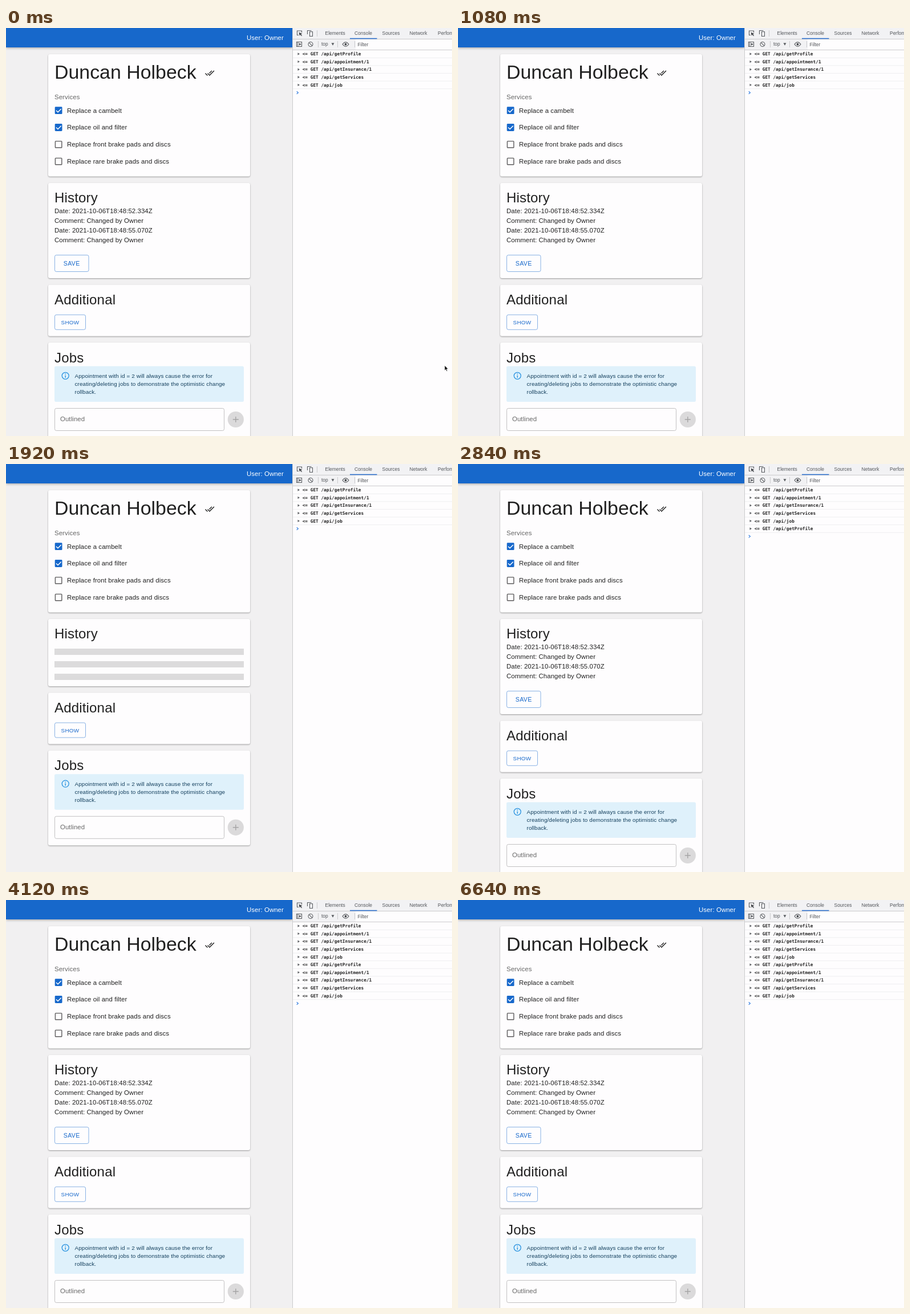
Write an HTML page that moves like this. It is 782 px wide and 716 px high and loops after 6.68 s.

```html
<!DOCTYPE html>
<html lang="en">
<head>
<meta charset="utf-8">
<title>Refetch on focus</title>
<style>
  html, body { margin: 0; width: 100%; height: 100%; overflow: hidden; background: #fefdfe; }
  svg { display: block; width: 782px; height: 716px; }
  text { font: 11.36px "Liberation Sans", Arial, sans-serif; letter-spacing: .0094em; fill: #202020; white-space: pre; }
  .name { font-size: 33.9px; letter-spacing: 0; }
  .title { font-size: 24px; letter-spacing: .0073em; }
  .grey { fill: #666; }
  .button { font-size: 9.9px; letter-spacing: .0286em; fill: #1768cb; }
  .alert { font-size: 9.9px; letter-spacing: .0107em; fill: #15405e; }
  .tab { font-size: 8.45px; letter-spacing: 0; fill: #55585c; }
  .log { font: bold 7.77px "DejaVu Sans Mono", monospace; letter-spacing: 0; fill: #222; }
  .start { font-family: Roboto, sans-serif; letter-spacing: 0; }
  .card { fill: #fefdfe; filter: drop-shadow(0 1px .8px rgba(0, 0, 0, .36)); }
  .outline { fill: none; stroke: #1768cb; stroke-opacity: .5; }
  .icon { fill: none; stroke: #5a5d61; stroke-width: 1.1; }
  .rule { stroke: #cbcbcd; stroke-width: 1; }
</style>
</head>
<body>
<svg viewBox="0 0 782 716">
  <g id="app">
    <rect width="502" height="716" fill="#f1f0f1"/>
    <rect width="502" height="34" fill="#1768cb" style="filter:drop-shadow(0 1.5px 2px rgba(0,0,0,.35))"/>
    <text x="422" y="21" style="fill:#fff">User: Owner</text>

    <rect class="card" x="74" y="46" width="354" height="214.5" rx="3"/>
    <text class="name" x="85" y="88.5">Duncan Holbeck</text>
    <path transform="translate(348.7 70.6) scale(.706)" fill="#202020" d="M18 7l-1.4-1.4-6.35 6.33 1.4 1.4zM22.2 5.6L11.7 16.2 7.5 12l-1.4 1.4 5.6 5.6 12-12zM.4 13.4L6 19l1.4-1.4L1.8 12z"/>
    <text class="grey" x="85" y="125">Services</text>
    <g id="services"></g>

    <rect class="card" id="historyCard" x="74" y="272" width="354" rx="3"/>
    <text class="title" x="85" y="306.3">History</text>
    <g id="history">
      <text x="85" y="325.3">Date: 2021-10-06T18:48:52.334Z</text>
      <text x="85" y="342.3">Comment: Changed by Owner</text>
      <text x="85" y="359.3">Date: 2021-10-06T18:48:55.070Z</text>
      <text x="85" y="376.3">Comment: Changed by Owner</text>
      <rect class="outline" x="85.5" y="398.5" width="59.5" height="29" rx="2.8"/>
      <text class="button" x="115.2" y="416.8" text-anchor="middle" style="font-size:10.6px">SAVE</text>
    </g>
    <path id="skeleton" fill="#dcdbdc" d="M85 324h332v11H85zM85 346h332v11H85zM85 368h332v11H85z"/>

    <g id="lower">
      <rect class="card" x="74" y="450.5" width="354" height="90.3" rx="3"/>
      <text class="title" x="85" y="485.3">Additional</text>
      <rect class="outline" x="85.5" y="503.3" width="54" height="26" rx="2.8"/>
      <text class="button" x="112.5" y="519.8" text-anchor="middle">SHOW</text>

      <rect class="card" x="74" y="552" width="354" height="166.5" rx="3"/>
      <text class="title" x="85" y="586.7">Jobs</text>
      <rect x="85" y="593.5" width="332" height="62.5" rx="2.8" fill="#dff1fb"/>
      <circle cx="104.2" cy="610.3" r="6" fill="none" stroke="#2a93e0" stroke-width="1.3"/>
      <path d="M104.2 606.6v1.5M104.2 609.4v4.3" stroke="#2a93e0" stroke-width="1.4"/>
      <text class="alert" x="120.5" y="613.8">Appointment with id = 2 will always cause the error for</text>
      <text class="alert" x="120.5" y="628">creating/deleting jobs to demonstrate the optimistic change</text>
      <text class="alert" x="120.5" y="642.3">rollback.</text>
      <rect x="85.5" y="667.5" width="297" height="39" rx="2.8" fill="none" stroke="#c2c1c2"/>
      <text class="grey" x="95" y="690.2">Outlined</text>
      <circle cx="402.8" cy="687" r="14.1" fill="#dbdadb"/>
      <path d="M397.8 687h10M402.8 682v10" stroke="#a5a4a5" stroke-width="1.4"/>
    </g>

    <rect x="502" width="280" height="716" fill="#fefdfe"/>
    <rect x="502" width="280" height="38" fill="#f2f2f4"/>
    <rect x="613" y="20" width="169" height="18" fill="#fefdfe"/>
    <path class="rule" d="M502.5 0V716M503 19.5H782M503 38.5H782M545.5 4v11M547.5 23v11M581.5 23v11M611.5 23v11"/>
    <path d="M603 18.5h47.5" stroke="#2b6fd0" stroke-width="1.6"/>
    <g id="tabs"></g>
    <path class="icon" d="M513 12.5h-2.5v-7.5h8v3M528.5 11V4.5h7M532.5 6.5h5v8h-5zM509.5 24.5h9v8h-9zM511.8 24.5v8"/>
    <path fill="#45484c" d="M513.5 7.5l6 2.4-2.4 1 2 2.4-1 .9-2-2.5-1.4 1.8zM514 26.2l3.6 2.3-3.6 2.3z"/>
    <path class="icon" d="M530 28.5a4 4 0 1 0 8 0a4 4 0 1 0-8 0M531.3 25.7l5.6 5.6M590 28.5q5.5-7.6 11 0q-5.5 7.6-11 0z"/>
    <circle cx="595.5" cy="28.5" r="1.9" fill="#45484c"/>
    <text class="tab" x="553" y="31.3">top</text>
    <path d="M570.5 26.3h5l-2.5 4.4z" fill="#5a5d61"/>
    <text class="tab" x="616.5" y="31.5">Filter</text>
    <g id="logs"></g>
    <path id="prompt" fill="none" stroke="#3b82e0" stroke-width="1.2" d="M509.7 -2.3l2.7 2.3-2.7 2.3"/>
  </g>

  <g id="startPage">
    <rect width="782" height="716" fill="#fefdfe"/>
    <circle cx="634.5" cy="148.5" r="31.5" fill="#3478ef"/>
    <rect x="436" y="208.3" width="398" height="31.5" rx="15.7" fill="#fff" style="filter:drop-shadow(0 .8px 2px rgba(32,33,36,.4))"/>
    <path fill="none" stroke="#4b4b4d" stroke-width="1.4" d="M451.6 222.7a3.3 3.3 0 1 0 6.6 0a3.3 3.3 0 1 0-6.6 0M457.3 225.1l4.1 4.1"/>
    <text class="start" x="473" y="228.3" style="fill:#505052">Search Nabelo or type a URL</text>
    <circle cx="635" cy="281" r="17" fill="#eeedef"/>
    <path d="M630 281h10M635 276v10" stroke="#222" stroke-width="1.4"/>
    <text class="start" x="635.3" y="317.8" text-anchor="middle" style="font-size:9.1px;font-weight:500">Add shortcut</text>
  </g>

  <path id="cursor" d="M0 0v9.2l2.1-1.9 1.4 3.2 1.6-.7-1.4-3.1h2.8z" fill="#111" stroke="#fff" stroke-width=".8"/>
</svg>
<script>
const $ = id => document.getElementById(id);
const show = (node, on) => { node.style.display = on ? '' : 'none'; };

const LOOP = 6680, STEP = 40;
const NEW_TAB = 1200, RETURN = 1920, LOADED = 2840;
const LOG_GAP = 260, ROW = 13.6, FIRST_ROW = 45.5;
const LOWER_SHIFT = 49.2;

$('services').innerHTML = ['a cambelt', 'oil and filter', 'front brake pads and discs', 'rare brake pads and discs']
  .map((label, i) => {
    const y = 144.7 + i * 29.8;
    const box = i < 2
      ? `<rect x="85.7" y="${y - 6.4}" width="12.8" height="12.8" rx="1.4" fill="#1768cb"/>
         <path d="M88 ${y}l3 3 5.6-5.8" fill="none" stroke="#fff" stroke-width="1.5"/>`
      : `<rect x="86.4" y="${y - 5.7}" width="11.4" height="11.4" rx=".8" fill="none" stroke="#5c5b5c" stroke-width="1.4"/>`;
    return `${box}<text x="107" y="${y + 3.8}">Replace ${label}</text>`;
  }).join('');

const tabs = { Elements: 559.5, Console: 611, Sources: 659.5, Network: 707.5, Performance: 757 };
$('tabs').innerHTML = Object.entries(tabs)
  .map(([label, x]) => `<text class="tab" x="${x}" y="12">${label}</text>`).join('');

const calls = ['getProfile', 'appointment/1', 'getInsurance/1', 'getServices', 'job'];
$('logs').innerHTML = [...calls, ...calls].map((call, i) => {
  const y = FIRST_ROW + i * ROW;
  return `<g><path d="M511.5 ${y - 2.2}l3.5 2.2-3.5 2.2z" fill="#5f6165"/>
    <text class="log" x="519.7" y="${y + 2.6}">&lt;= GET /api/${call}</text>
    <path d="M503 ${y + 6.8}H782" stroke="#eeeef0"/></g>`;
}).join('');
const logRows = [...$('logs').children];

function draw(t) {
  const loading = t >= RETURN && t < LOADED;
  show($('startPage'), t >= NEW_TAB && t < RETURN);
  show($('history'), !loading);
  show($('skeleton'), loading);
  $('historyCard').setAttribute('height', loading ? 118 : 167);
  $('lower').setAttribute('transform', `translate(0 ${loading ? -LOWER_SHIFT : 0})`);

  const fresh = t < LOADED ? 0 : Math.min(calls.length, 1 + Math.floor((t - LOADED) / LOG_GAP));
  const rows = calls.length + fresh;
  logRows.forEach((row, i) => show(row, i < rows));
  $('prompt').setAttribute('transform', `translate(0 ${FIRST_ROW + rows * ROW})`);

  // The pointer leaves through the top edge to reach the tab strip.
  const p = Math.min(1, Math.max(0, (t - 120) / 640));
  const ease = p * p * (3 - 2 * p);
  show($('cursor'), p < 1);
  $('cursor').setAttribute('transform', `translate(${769 - 29 * ease} ${592 - 612 * ease})`);
}

function tick() {
  const t = performance.now() % LOOP;
  draw(t - t % STEP);
  requestAnimationFrame(tick);
}
tick();
</script>
</body>
</html>
```
